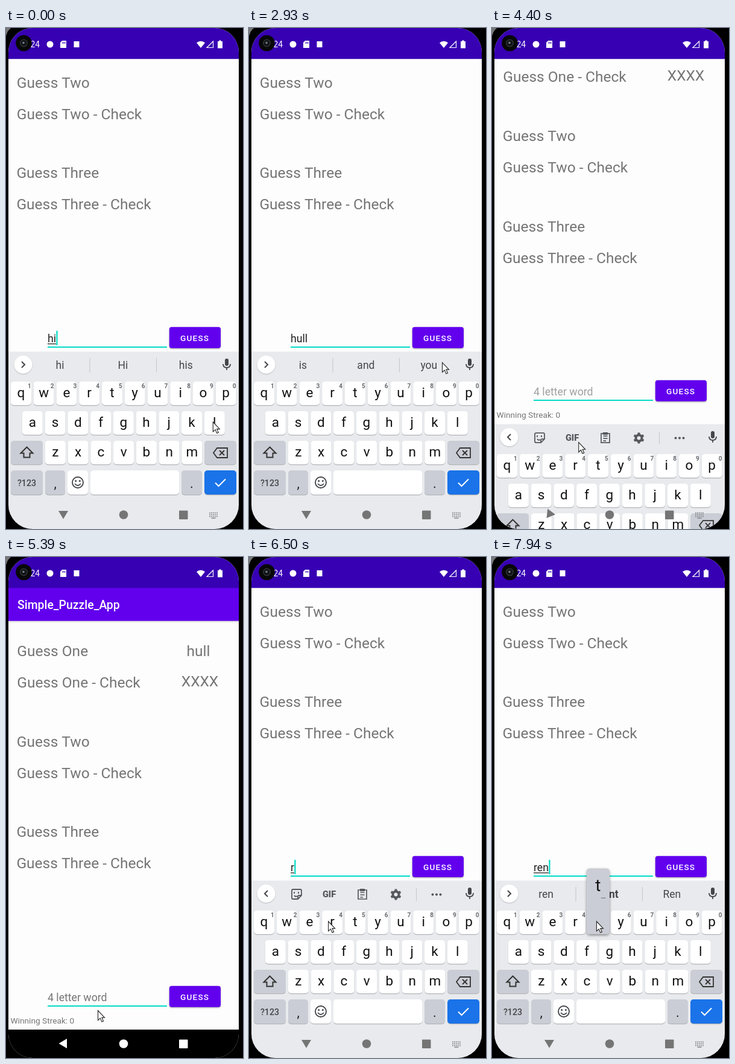
An HTML page with a canvas that plays this animation: 393 px wide and 829 px high, repeating every 8000 ms.

```html
<!DOCTYPE html>
<html lang="en">
<head>
<meta charset="utf-8">
<title>Word guessing app</title>
<style>
  html, body { margin: 0; width: 100%; height: 100%; overflow: hidden; background: #000; }
  canvas { display: block; }
</style>
</head>
<body>
<canvas width="393" height="829"></canvas>
<script>
const c = document.querySelector('canvas').getContext('2d');
const LOOP = 8000, PAN = 215, KEYBOARD = 293, PRESS = 120;
const GUESS_AT = 3620, HIDE_AT = 4160, FIELD_AT = 5390;
const PURPLE = '#6200ee', TEAL = '#03dac5', KEY = '#cacdd5', INK = '#444649', GRAY = '#757575';

const keys = {};
['qwertyuiop', 'asdfghjkl', 'zxcvbnm'].forEach((letters, row) => {
  const left = 194.8 - 37.75 * (letters.length - 1) / 2 + (row === 2 ? 0.3 : 0);
  [...letters].forEach((ch, i) => { keys[ch] = { x: left + 37.75 * i, y: 604.5 + 49 * row, digit: row ? '' : (i + 1) % 10 }; });
});
const spots = {
  back: [352, 699], third: [320, 553], enter: [361, 679], guess: [330, 521],
  hide: [95, 799], page: [316, 277], field: [152, 750]
};
for (const ch in keys) spots[ch] = [keys[ch].x - 3, keys[ch].y - 2];

// Where the pointer stops, when, and the word in the field after a tap there.
const stops = [
  [0, 'l'], [330, 'l'], [750, 'back', 'h'], [930, 'back'], [1440, 'i', 'hi'], [1710, 'l', 'hil'],
  [2250, 'third', 'hull'], [2870, 'third'], [3200, 'enter'], [GUESS_AT, 'guess', ''], [3890, 'third'],
  [HIDE_AT, 'hide'], [4970, 'page'], [FIELD_AT, 'field', ''], [6120, 'g'], [6380, 'r', 'r'],
  [6890, 'e', 're'], [7430, 'n', 'ren'], [7940, 't', 'rent']
].map(([time, spot, word]) => ({ time, spot, word }));
const suggestions = {
  h: ['h', 'H', 'have'], hi: ['hi', 'Hi', 'his'], hil: ['hil', 'hill', 'hull'], hull: ['is', 'and', 'you'],
  r: ['are', 'right', 'really'], re: ['re', 'rent', 'really'], ren: ['ren', 'rent', 'Ren']
};

const progress = (t, start, length) => Math.min(1, Math.max(0, (t - start) / length));
const smooth = u => u * u * (3 - 2 * u);
const easeOut = u => 1 - (1 - u) ** 3;

const entry = t => stops.findLast(s => s.word !== undefined && s.time + PRESS <= t) || { time: -PRESS, word: 'hi' };

function pointer(t) {
  const i = stops.findLastIndex(s => s.time + 60 <= t);
  const from = stops[Math.max(i, 0)], to = stops[i + 1] || from;
  const leave = from.time + 60, arrive = Math.max(leave + 30, to.time - 150);
  const u = smooth(progress(t, leave, arrive - leave));
  return spots[from.spot].map((v, axis) => v + (spots[to.spot][axis] - v) * u);
}

function text(s, x, y, size, color, align = 'left', weight = 400) {
  c.font = `${weight} ${size}px Roboto, sans-serif`;
  c.textAlign = align;
  c.fillStyle = color;
  c.fillText(s, x, y);
}
function box(x, y, w, h, color, r = 0) {
  c.fillStyle = color;
  c.beginPath();
  c.roundRect(x, y, w, h, r);
  c.fill();
}
function disc(x, y, r, color) { box(x - r, y - r, 2 * r, 2 * r, color, r); }
function icon(d, x, y, fill, stroke, width = 2, angle = 0) {
  const path = new Path2D(d);
  c.save();
  c.translate(x, y);
  c.rotate(angle * Math.PI / 180);
  c.lineWidth = width;
  if (fill) { c.fillStyle = fill; c.fill(path); }
  if (stroke) { c.strokeStyle = stroke; c.stroke(path); }
  c.restore();
}
function raised(color, blur, dy, paint) {
  c.save();
  c.shadowColor = color;
  c.shadowBlur = blur;
  c.shadowOffsetY = dy;
  paint();
  c.restore();
}

function drawPage(t, pan) {
  c.save();
  c.translate(0, -pan);
  raised('#0003', 3, 1, () => box(4, 51, 382, 54.7, PURPLE));
  text('Simple_Puzzle_App', 19, 86, 19.4, '#fff', 'left', 500);
  ['One', 'Two', 'Three'].forEach((n, i) => {
    const x = 18.2 - 0.4 * i, y = 164 + 149.7 * i;
    text(`Guess ${n}`, x, y, 24.5, GRAY);
    text(`Guess ${n} - Check`, x, y + 52, 24.5, GRAY);
  });
  text('hull', 319, 164, 24.5, GRAY, 'center');
  text('XXXX', 321.5, 214, 24.5, GRAY, 'center');
  text('Winning Streak: 0', 7.5, 771.5, 13.7, GRAY);

  const { word, time } = entry(t);
  text(word || '4 letter word', 69, 735, 17.7, word ? '#222' : pan ? '#a0a0a0' : GRAY);
  const width = word && c.measureText(word).width;
  if (word && word !== 'hull') box(69, 737, width, 1.2, '#222');
  box(69, 742, 198, 2, TEAL);
  const caretOn = (t - time - PRESS) % 1000 < 500;
  if (caretOn) box(69.3 + +width, 716, 2.2, 24, TEAL);

  raised('#0005', 2.5, 1.2, () => box(270.8, 709.7, 85.2, 35, PURPLE, 4));
  if (t >= GUESS_AT && t < HIDE_AT) {
    const glow = c.createRadialGradient(320, 728, 5, 320, 728, 55);
    glow.addColorStop(0, '#843bf0');
    glow.addColorStop(1, '#762bea');
    box(270.8, 709.7, 85.2, 35, glow, 4);
  }
  c.letterSpacing = '1.21px';
  text('GUESS', 289, 733, 13.6, '#fff', 'left', 500);
  c.letterSpacing = '0px';
  c.restore();
}

function drawStatusBar() {
  box(4, 0, 382, 51.3, '#3700b3');
  text('24', 40.5, 31.5, 13.8, '#fff');
  disc(73, 27, 5.5, '#fff');
  icon('M-2-6H5V6H-5V-3Z', 95, 27, '#fff');
  icon('M-1-4V-1M1-4V-1M3-4V-1', 95, 27, null, '#3700b3', 1);
  box(112.5, 22, 9, 10, '#fff');
  icon('M0 6L-7-2.5A10 10 0 0 1 7-2.5Z', 323, 27, '#fff');
  icon('M5.5-5V5.5H-5Z', 338, 27, null, '#fff', 1.2);
  icon('M-4-5H-1.7V-6.5H1.7V-5H4V6.5H-4Z', 355, 27, '#fff');
  disc(29.5, 25, 13.3, '#080808');
  disc(29.5, 25, 6.5, '#303336');
  disc(29.5, 25, 5, '#111417');
  disc(29, 24.5, 1.8, '#777d85');
}

function drawToolbar() {
  const ink = '#55585c';
  icon('M-6-8H6Q8-8 8-6V2L2 8H-6Q-8 8-8 6V-6Q-8-8-6-8ZM8 2H4Q2 2 2 4V8', 79, 558, null, ink, 1.8);
  icon('M-4-4V-1M3-4V-1M-4 2Q-2 5 1 3', 79, 558, null, ink, 1.8);
  text('GIF', 133, 563, 14.5, ink, 'center', 900);
  icon('M-7-7H7V8H-7ZM-3.5-3H3.5M-3.5 1H3.5M-3.5 5H1', 188, 558, null, ink, 1.7);
  icon('M-4-9H4V-5H-4Z', 188, 558, ink);
  icon('M5 0A5 5 0 1 1-5 0A5 5 0 1 1 5 0', 243.5, 558.5, null, ink, 4);
  for (let a = 0; a < 180; a += 60) icon('M0-9V-5M0 9V5', 243.5, 558.5, null, ink, 4, a);
  box(277, 548, 1, 21, '#c4c7ca');
  for (let i = -1; i < 2; i++) disc(311 + 6.5 * i, 558.5, 2, ink);
}

function drawStrip(words) {
  raised('#0003', 2, 1, () => disc(28.5, 557, 15, '#fff'));
  icon('M-2.5-5L2.5 0L-2.5 5', 28.5, 557, null, INK, 2, words ? 0 : 180);
  box(363, 547, 6, 12, INK, 3);
  icon('M-6-1Q-6 5 0 5T6-1M0 5V9', 366, 557, null, INK, 1.8);
  if (!words) return drawToolbar();
  words.forEach((w, i) => {
    const certain = words[0] === 'ren' && i === 1;
    text(w, 89.5 + 104.4 * i, 564, 17.5, INK, 'center', certain ? 700 : 400);
    if (i) box(28 + 110.5 * i, 546, 1, 24, '#c4c7ca');
  });
}

function drawKey(x, y, w, color, h = 39) {
  box(x, y + 1.2, w, h, '#b2b5b9', 5);
  box(x, y, w, h, color, 5);
}

function drawPopup(ch) {
  const { x, y } = keys[ch];
  raised('#0006', 4, 1.5, () => box(x - 19, y - 89, 38, 109, KEY, 5));
  text(ch, x, y - 51.5, 28, '#111', 'center');
  if ('aceinostuyz'.includes(ch)) text('…', x + 8.5, y - 40, 12, '#222', 'center');
}

function drawKeyboard(t, drop) {
  c.save();
  c.translate(0, drop);
  box(4, 535.5, 382, 300, '#e8eaed');
  drawStrip(suggestions[entry(t - 140).word]);
  for (const ch in keys) {
    const { x, y, digit } = keys[ch];
    drawKey(x - 17, y - 19.5, 34, '#fff');
    text(ch, x, y + 6.5, 22.5, '#111', 'center');
    text(digit, x + 14, y - 9, 10, '#686b70', 'center', 700);
  }
  drawKey(8, 683, 53, KEY);
  icon('M0-9L-10 1H-5V8H5V1H10Z', 34.5, 702.5, null, '#333', 2);
  drawKey(329, 683, 53, KEY);
  icon('M-6-8H11V8H-6L-12 0ZM-2-4L6 4M6-4L-2 4', 356, 703, null, '#333', 1.8);
  drawKey(8, 732, 53, KEY, 40);
  text('?123', 34.5, 757.5, 14.2, INK, 'center', 500);
  drawKey(65, 732, 33, KEY, 40);
  text(',', 81.7, 761, 22, '#222', 'center');
  drawKey(102, 732, 34, '#fff', 40);
  icon('M9 0A9 9 0 1 1-9 0A9 9 0 1 1 9 0M-5 2Q0 8 5 2', 119, 752, null, INK, 1.9);
  disc(115.7, 749.5, 1.5, INK);
  disc(122.3, 749.5, 1.5, INK);
  drawKey(140, 732, 147, '#fff', 40);
  drawKey(291, 732, 34, KEY, 40);
  text('.', 308, 761, 22, '#222', 'center');
  drawKey(329, 732, 53, '#1a73e8', 40);
  icon('M-8.5 0L-3 5.5L8.5-6', 355.5, 752.5, null, '#fff', 2);

  const tap = stops.find(s => s.word && keys[s.spot] && t >= s.time && t < s.time + PRESS);
  if (tap) drawPopup(tap.spot);
  c.restore();
}

function drawNavigation(covered, turn) {
  const color = covered ? GRAY : '#fff';
  icon('M-7.5 0L6-8V8Z', 95, 805, color, null, 0, -turn);
  disc(195, 805.5, 7.3, color);
  box(287, 798.5, 14.5, 14.5, color, 1);
  if (!covered) return;
  for (let i = 0; i < 15; i++) box(337 + i % 5 * 3, 801.5 + 3 * Math.floor(i / 5), 1.8, 1.8, '#85878a');
  box(340.5, 810.3, 7, 1.5, '#85878a');
}

function draw() {
  const t = performance.now() % LOOP;
  const closing = smooth(progress(t, HIDE_AT + 30, 480));
  const opening = progress(t, FIELD_AT + 20, 250);
  const open = 1 - closing + easeOut(opening);
  const drop = KEYBOARD * (1 - open);

  box(0, 0, 393, 829, '#000');
  box(0, 0, 12, 12, '#777');
  box(0.5, -3, 420, 900, '#000', 18);
  c.save();
  c.beginPath();
  c.roundRect(4, 0, 382, 829, 40);
  c.clip();
  box(4, 0, 382, 829, '#fdfdfd');
  drawPage(t, PAN * open);
  drawStatusBar();
  box(4, 782, 382, 47, '#000');
  if (open > 0) drawKeyboard(t, drop);
  drawNavigation(drop < 246, 90 * (1 - closing + opening));
  c.restore();
  const [x, y] = pointer(t);
  icon('M0 0V16L3.8 12.6L6.4 18.6L9 17.4L6.4 11.6H11Z', x + 0.5, y + 0.5, '#fff', '#222', 1.1);
  requestAnimationFrame(draw);
}
draw();
</script>
</body>
</html>
```
